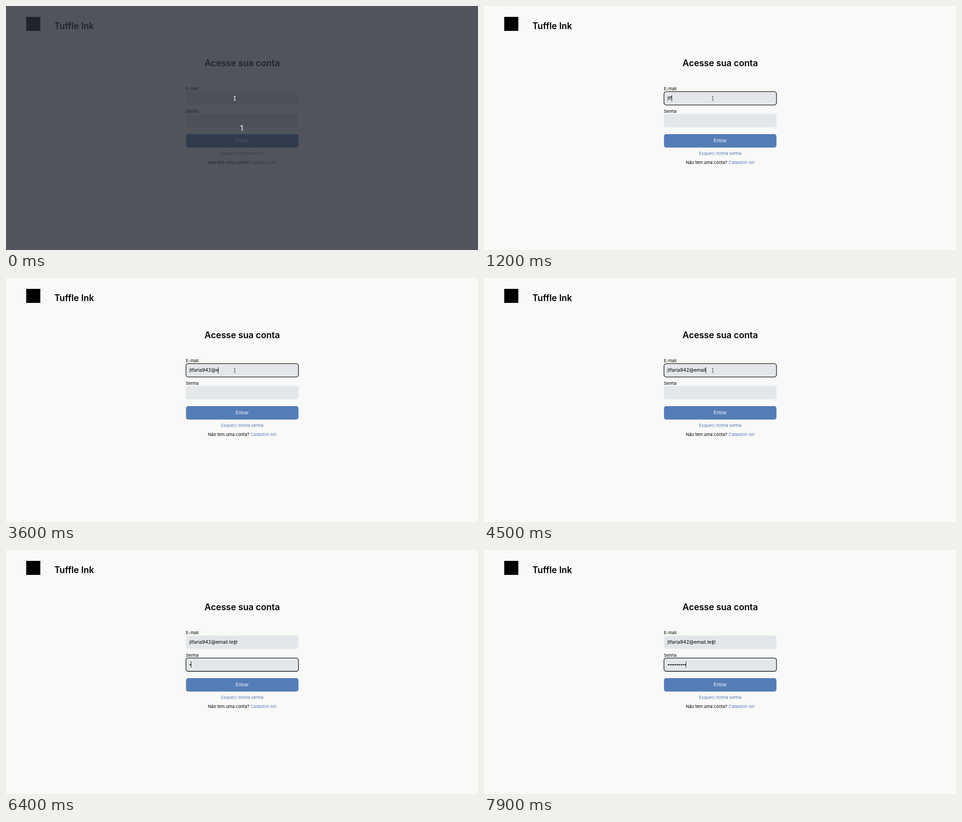
Write an HTML page that moves like this. It is 1039 px wide and 539 px high and loops after 8000 ms.

```html
<!DOCTYPE html>
<html lang="pt-BR">
<head>
<meta charset="utf-8">
<title>Acesse sua conta</title>
<style>
  html, body { margin: 0; width: 100%; height: 100%; overflow: hidden; background: #f9f9f7; }
  svg { display: block; width: 1039px; height: 539px; }
  text { font: 9.35px Inter, sans-serif; white-space: pre; }
  .title { font-size: 19.4px; font-weight: 600; }
  .mid { text-anchor: middle; }
  .typed { font-size: 10.6px; }
  .link { fill: #547db7; }
  .button { font-size: 10.2px; fill: #fff; }
  .field { fill: #e3e7ea; }
  .ring { fill: none; stroke: #0b0b0b; stroke-width: 1.3; }
  .count { font: 500 18px "Open Sans", sans-serif; fill: #fff; }
  #pointer { fill: none; stroke: #555; }
  #pointer.light { stroke: #fff; stroke-width: 1.3; }
</style>
</head>
<body>
<svg viewBox="0 0 1039 539">
  <rect width="1039" height="539" fill="#f9f9f7"/>
  <rect x="44.5" y="24" width="31" height="31"/>
  <text class="title" x="106.5" y="51">Tuffle Ink</text>
  <text class="title mid" x="520" y="132.5">Acesse sua conta</text>

  <text x="396" y="186">E-mail</text>
  <rect class="field" x="396.2" y="189.2" width="247.6" height="29.4" rx="5"/>
  <text x="396" y="235.5">Senha</text>
  <rect class="field" x="396.2" y="238.6" width="247.6" height="29.4" rx="5"/>

  <rect x="396.2" y="283" width="247.6" height="29.8" rx="5" fill="#547db7"/>
  <text class="button mid" x="520" y="301.3">Entrar</text>
  <text class="link mid" x="520" y="329.3">Esqueci minha senha</text>
  <text class="mid" x="490" y="349.2">Não tem uma conta?</text>
  <text class="link mid" x="567" y="349.2">Cadastre-se!</text>

  <rect id="ring" class="ring" x="396.2" width="247.6" height="29.4" rx="5"/>
  <text id="email" class="typed" x="403.7" y="207.4"></text>
  <g id="dots"></g>
  <rect id="caret" y="197" width="1" height="14" fill="#222"/>

  <rect id="shade" width="1039" height="539" fill="#272c35" fill-opacity=".8"/>
  <text id="count" class="count mid" x="519.5" y="276">1</text>
  <path id="pointer" d="M501.6 200h3.8M503.5 200v8.4M501.6 208.4h3.8"/>
</svg>
<script>
const LOOP = 8000, FOCUS_EMAIL = 400, FOCUS_PASS = 5300;
const BLINK = [5900, 6400];

// [time, characters typed at that time]
const keys = [
  [800, "j"], [1100, "t"], [1200, "f"],
  [1800, "a"], [2000, "r"], [2100, "i"], [2300, "a"],
  [2600, "9"], [2800, "4"], [2900, "2"], [3300, "@"],
  [3600, "e"], [3900, "m"], [4100, "a"], [4200, "i"], [4500, "l"],
  [4700, "."], [4800, "t"], [5000, "e"], [5100, "st"]
];
const dotTimes = [6400, 6600, 6800, 6900, 7100, 7200, 7400, 7600, 7800, 7900];
const DOT_STEP = 4.1;

const el = id => document.getElementById(id);
const show = (node, on) => node.setAttribute("visibility", on ? "visible" : "hidden");
const email = el("email"), ring = el("ring"), caret = el("caret");

const dots = dotTimes.map((_, i) => {
  const c = document.createElementNS("http://www.w3.org/2000/svg", "circle");
  c.setAttribute("cx", 405.8 + i * DOT_STEP);
  c.setAttribute("cy", 253.4);
  c.setAttribute("r", 1.4);
  return el("dots").appendChild(c);
});

function draw(t) {
  const intro = t < 100, inPass = t >= FOCUS_PASS, focused = t >= FOCUS_EMAIL;
  show(el("shade"), intro);
  show(el("count"), intro);
  el("pointer").classList.toggle("light", intro);

  const typed = keys.filter(k => t >= k[0]).map(k => k[1]).join("");
  if (email.textContent !== typed) email.textContent = typed;
  const count = dotTimes.filter(d => t >= d).length;
  dots.forEach((d, i) => show(d, i < count));

  show(ring, focused);
  ring.setAttribute("y", inPass ? 238.6 : 189.2);
  show(caret, focused && !(t >= BLINK[0] && t < BLINK[1]));
  const width = typed ? email.getComputedTextLength() : 0;
  caret.setAttribute("x", Math.round(403 + (inPass ? count * DOT_STEP : width)));
  caret.setAttribute("y", inPass ? 246 : 197);
}

const start = performance.now();
function tick() {
  draw((performance.now() - start) % LOOP);
  requestAnimationFrame(tick);
}
tick();
</script>
</body>
</html>
```
